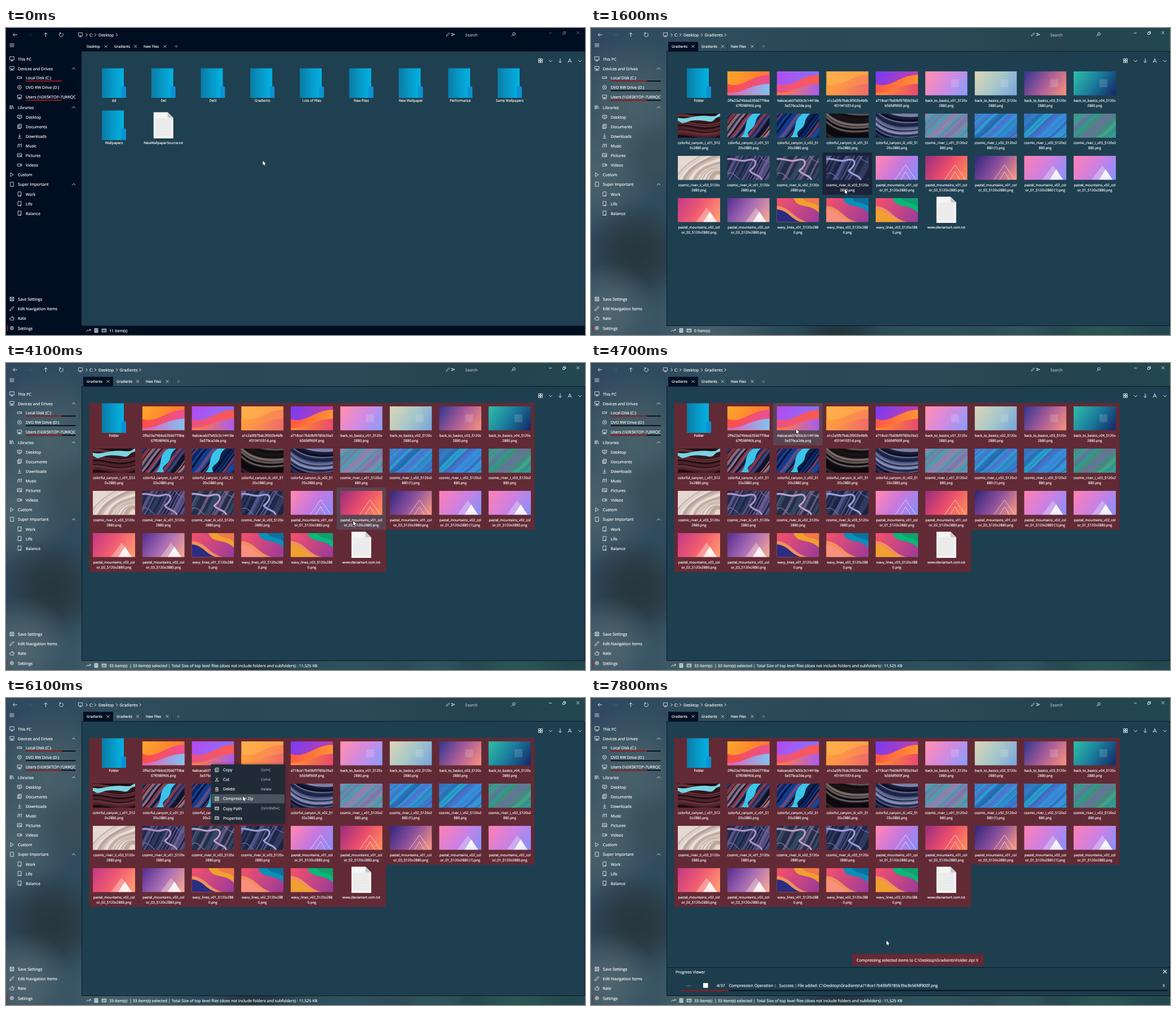
Write an HTML page with a canvas that moves like this. It is 1027 px wide and 545 px high and loops after 8000 ms.

```html
<!DOCTYPE html>
<html>
<head>
<meta charset="utf-8">
<style>
html, body { margin: 0; width: 100%; height: 100%; overflow: hidden; background: #010d20; }
canvas { display: block; }
</style>
</head>
<body>
<canvas id="stage" width="1027" height="545"></canvas>
<script>
const W = 1027, H = 545, LOOP = 8000, RED = '#a31f22', PICK = '#622a35';
const view = document.getElementById('stage').getContext('2d');
let g = view, seed = 1;
const rnd = () => (seed = seed * 16807 % 2147483647) / 2147483647;
const clamp = v => Math.max(0, Math.min(1, v));

// ---- drawing helpers ----
function layer(draw) {
  const c = document.createElement('canvas');
  c.width = W; c.height = H;
  g = c.getContext('2d');
  draw();
  g = view;
  return c;
}
function box(x, y, w, h, fill) {
  g.fillStyle = fill;
  g.fillRect(x, y, w, h);
}
function blend(colors, x0, y0, x1, y1) {
  const l = g.createLinearGradient(x0, y0, x1, y1);
  colors.forEach((c, i) => l.addColorStop(i / Math.max(1, colors.length - 1), c));
  return l;
}
function fill(d, style) { g.fillStyle = style; g.fill(new Path2D(d)); }
function line(d, style = '#fff', width = 0.8) {
  g.strokeStyle = style;
  g.lineWidth = width;
  g.stroke(new Path2D(d));
}
// y is the visual middle of the capitals; the thin outline gives small text its weight
function text(s, x, y, size = 7.07, color = '#fff', align = 'left') {
  g.font = size + 'px "Open Sans", "Noto Sans", sans-serif';
  g.textRendering = 'geometricPrecision';
  g.textAlign = align;
  g.fillStyle = g.strokeStyle = color;
  g.lineWidth = 0.15;
  g.fillText(s, x, y + size * 0.36);
  g.strokeText(s, x, y + size * 0.36);
}
const icons = {
  back: 'M4 0H-3.5M-.5-3L-3.5 0L-.5 3',
  next: 'M-4 0H3.5M.5-3L3.5 0L.5 3',
  up: 'M0 4V-3.5M-3-.5L0-3.5L3-.5',
  down: 'M0-4V3.5M-3 .5L0 3.5L3 .5',
  reload: 'M-1.5-3A3.4 3.4 0 1 0 1.5-3M-3.5-3.5H-1V-1',
  menu: 'M-4-2.5H4M-4 0H4M-4 2.5H4',
  pc: 'M-4-4H4V2H-4ZM0 2V4M-2.5 4H2.5',
  net: 'M-4-3.5H4V1H-4ZM0 1V3.5M-4 3.5H4M-1.5 2.5H1.5',
  drive: 'M-4-1.5H4V1.5H-4ZM2 0H3',
  disc: 'M3.6 0A3.6 3.6 0 1 1-3.6 0A3.6 3.6 0 1 1 3.6 0M1 0A1 1 0 1 1-1 0A1 1 0 1 1 1 0',
  books: 'M-3.7-3.5V3.5M-2-3.5V3.5M0-3.5V3.5M1.2-3.2L3.8 3.5',
  desk: 'M-4-3H4V2H-4ZM-2 3.5H2M-2-1H2',
  doc: 'M-2-4H3.5V2.5H-2ZM-2-2.5H-3.5V4H2V2.5M-.5-2H2M-.5-.3H2',
  load: 'M0-4V2M-2.5-.5L0 2L2.5-.5M-3 4H3',
  music: 'M-3-2L0-3V2M-3-2V3M-4 3H-3M-1 2H0M1-1L3.5-3.5V2.5M2 2.5H3.5',
  image: 'M-4-3H4V3H-4ZM-4 2L-1-1L3 3M1-1L4 2',
  video: 'M-4-2H2V2H-4ZM2-.5L4-2V2L2 .5',
  play: 'M-2.5-3.5L3 0L-2.5 3.5Z',
  page: 'M-3-4H3V4H-3Z',
  note: 'M-3-4H3V4H-3ZM0 2.5H1.5V4',
  save: 'M-3.5-3.5H3.5V3.5H-3.5ZM-2-3.5V-1H2V-3.5M-2 3.5V1H2V3.5',
  pen: 'M-4 4L-3 1L2.5-4L4-2.5L-1.5 3Z',
  thumb: 'M-4 0H-2L0-3.5H1V-1H4L3 3.5H-2L-4 2Z',
  gear: 'M2.8 0A2.8 2.8 0 1 1-2.8 0A2.8 2.8 0 1 1 2.8 0M1.1 0A1.1 1.1 0 1 1-1.1 0A1.1 1.1 0 1 1 1.1 0M0-4V-3M0 3V4M-4 0H-3M3 0H4M-3-3L-2-2M2 2L3 3M3-3L2-2M-2 2L-3 3',
  right: 'M-1.5-2.5L1.5 0L-1.5 2.5',
  open: 'M-3 1.5L0-1.5L3 1.5',
  fold: 'M-3-1.5L0 1.5L3-1.5',
  close: 'M-2.5-2.5L2.5 2.5M2.5-2.5L-2.5 2.5',
  plus: 'M-3 0H3M0-3V3',
  find: 'M3.2-1A2.2 2.2 0 1 1-1.2-1A2.2 2.2 0 1 1 3.2-1M-.6 .6L-3.2 3.2',
  grid: 'M-3.5-3.5H-.5V-.5H-3.5ZM.5-3.5H3.5V-.5H.5ZM-3.5 .5H-.5V3.5H-3.5ZM.5 .5H3.5V3.5H.5Z',
  abc: 'M-3.2 3.5L0-3.5L3.2 3.5M-2 1.2H2',
  send: 'M-3-2.3L3 0L-3 2.3L-1 0Z',
  min: 'M-2.5 0H2.5',
  restore: 'M-2.5-1H1V2.5H-2.5ZM-1-1V-2.5H2.5V1H1',
  chart: 'M-4 2L-1-1L1 1L4-2M1.5-2H4V.5',
  blocks: 'M-3-3.5H3V3.5H-3ZM-1-3.5V3.5M-3-1H3M1-3.5V3.5M-3 1.5H3',
  card: 'M-3.8-2.8H3.8V2.8H-3.8ZM-3.8-1.2H3.8M-3 1H-1M0 1H3',
  cut: 'M-2-4L1.5 2M2-4L-1.5 2M-1 3A1 1 0 1 1-3 3A1 1 0 1 1-1 3M3 3A1 1 0 1 1 1 3A1 1 0 1 1 3 3',
  bin: 'M-3-2.5H3M-2.4-2.5V4H2.4V-2.5M-1-3.8H1M-.8-1V2.5M.8-1V2.5'
};
function icon(name, x, y, color, scale = 1) {
  g.save();
  g.translate(x, y);
  g.scale(scale, scale);
  line(icons[name], color);
  g.restore();
}

// ---- files ----
const desktop = ['dd', 'Del', 'Del3', 'Gradients', 'Lots of Files', 'New Files', 'New Wallpaper',
  'Performance', 'Same Wallpapers', 'Wallpapers', 'NewWallpaperSource.txt'];
const basics = n => `back_to_basics_v0${n}_5120x|2880.png`;
const peaks = (v, n, copy = '') => `pastel_mountains_v0${v}_col|or_0${n}_5120x2880${copy}.png`;
const gradients = ['Folder',
  '2ffe23a74bbc63566779be|67f098f406.png', '4a6cecab37e50c3c14418e|5e57bca2de.png',
  'a1c2a5fb7bdc3f002b4bfb|451941051d.png', 'a718ce17b69bf9785b39a3|b56fdf900f.png',
  basics(1), basics(2), basics(3), basics(4),
  'colorful_canyon_i_v01_512|0x2880.png', 'colorful_canyon_ii_v01_51|20x2880.png',
  'colorful_canyon_ii_v02_51|20x2880.png', 'colorful_canyon_iii_v01_51|20x2880.png',
  'colorful_canyon_iii_v02_51|20x2880.png',
  'cosmic_river_i_v01_5120x2|880.png', 'cosmic_river_i_v02_5120x2|880 (1).png',
  'cosmic_river_i_v02_5120x2|880.png', 'cosmic_river_i_v03_5120x2|880.png',
  'cosmic_river_ii_v03_5120x|2880.png', 'cosmic_river_iii_v01_5120x|2880.png',
  'cosmic_river_iii_v02_5120x|2880.png', 'cosmic_river_iii_v03_5120x|2880.png',
  peaks(1, 1), peaks(1, 2), peaks(1, 3), peaks(2, 1, ' (1)'), peaks(2, 1), peaks(2, 2), peaks(2, 3),
  'wavy_lines_v01_5120x288|0.png', 'wavy_lines_v02_5120x288|0.png', 'wavy_lines_v03_5120x288|0.png',
  'www.deviantart.com.txt'];

// kind, then its colours, one per picture
const looks = `dunes #ffa42c #ff6a30 #ff5038 #e850a0 #d868c8 #80c4f0
dunes #b44cf0 #7a7cf8 #e8508c #ff5a4a #ff7a40 #a85cf0
dunes #ffb04a #ff9a4c #ffa03c #f8805c #ff9848 #ee6c68
dunes #7a3cf0 #d0409c #ff5048 #ff9a30 #ff8a2c #e84c70
logo #ff8fb0 #d48ae0 #8f9cf8
logo #d8d4b8 #a8c8c8 #7ca8dc
logo #3c3a90 #a85c98 #f08c80
logo #2cb8a8 #1a7c9c #14306c
ridge #1c0c14 #5a2830 #2a1018 #904c4c #381820
canyon #10142c #c84850 #24488c #d89490 #14142c
canyon #081434 #2058b8 #0c1c50 #b84c60 #103484
sweep #0c0a0e #3c3030 #18141a #948480 #1c181a
sweep #0a0c1c #2c3868 #141830 #a0a8d8 #182040
silk #5a8ca0 #c070b0 #3cb0b0 #8a70b0 #50a0b8
silk #2c84c4 #28b0d0 #5a68d0 #3c90e0 #2868b0
silk #2c84c4 #28b0d0 #5a68d0 #3c90e0 #2868b0
silk #3c8c84 #30b890 #6a70a0 #2c9c9c #508c70
sand #e4d8d0 #c4a48c #f0e8e4 #b09c98 #d8c8bc
river #1c2444 #7c6ca8 #344468 #d0b0d0
river #243048 #8c74a8 #3c5470 #d8c0d0
river #1c2440 #6c70b0 #3c4870 #bcc0e0
lines #ff86b4 #c878dc #8c8cf8
lines #a0307c #e84c6c #ff8a5c
lines #3a2a80 #8c509c #f09484
peaks #f880b8 #d080e0 #8c90f8
peaks #f880b8 #d080e0 #8c90f8
peaks #c83c84 #f05c70 #ff9a74
peaks #5c3494 #a86cb4 #f0a498
wavy #f0a030 #f07848 #2c2c80
wavy #0890b8 #0c70a0 #f8907c
wavy #08b878 #10a070 #f0a030`.split('\n').map(s => s.split(' '));

// soft overlapping ribbons; curve(u) gives the path for u from 0 to 1
function ribbons(colors, n, width, curve) {
  g.save();
  g.filter = 'blur(0.7px)';
  g.globalAlpha = 0.65;
  for (let k = 0; k < n; k++)
    line(curve(k / n), colors[Math.floor(rnd() * colors.length)], width * (0.3 + rnd()));
  g.restore();
}
const slope = lean => u => {
  const x = u * 150 - 65 + rnd() * 4;
  return `M${x} 46C${x + lean * 0.4} 34 ${x + lean * 0.5} 14 ${x + lean} -4`;
};
const painters = {
  dunes(c) {
    fill('M0 22C26 32 42 6 75 6V42H0Z', blend([c[2], c[3]], 0, 10, 75, 36));
    fill('M0 38C28 40 44 22 75 22V42H0Z', blend([c[4], c[5]], 10, 38, 75, 38));
  },
  logo() { box(46, 14, 14, 14, 'rgba(255,255,255,.15)'); },
  ridge(c) {
    ribbons(c, 26, 4, u => `M-4 ${u * 50}C20 ${u * 50 - 6} 40 ${u * 50 + 14} 80 ${u * 50 - 2}`);
    fill('M0 7C14 12 28 2 52 4S64 2 75 0V5C62 8 66 16 54 14S28 10 16 15S4 12 0 13Z', '#78d4e0');
  },
  canyon(c) {
    ribbons(c, 44, 5, slope(42));
    fill('M24 42C38 30 26 14 46 0H60C46 10 54 18 43 27S38 36 38 42Z', '#3cc4e8');
  },
  silk(c) { ribbons(c, 40, 6, slope(60)); },
  sweep(c) { ribbons(c, 30, 4, u => `M-4 ${u * 64 - 30}C14 ${u * 58 - 6} 44 ${u * 54 + 2} 80 ${u * 50 - 2}`); },
  sand(c) { ribbons(c, 28, 4, u => `M${u * 70 - 8} 46C${u * 70} 22 ${u * 50 + 30} ${u * 30 + 2} 80 ${u * 60 - 20}`); },
  river(c) {
    ribbons(c.slice(0, 3), 30, 6, slope(30));
    const d = 'M-2 6C12 2 22 12 34 8S54 8 48 18S36 24 44 30S60 34 62 46';
    line(d, c[1], 4);
    line(d, c[3], 1.4);
    line('M58 -2C62 10 70 8 78 14M0 32C10 26 16 38 24 44', c[1], 1.2);
  },
  lines() { line('M34 43L53 16L72 43M44 43L53 28L62 43', 'rgba(255,255,255,.85)', 0.7); },
  peaks() {
    fill('M32 42.5L51 17L70 42.5Z', 'rgba(255,255,255,.3)');
    fill('M45 42.500L57 24L69 42.5Z', blend(['#fff', 'rgba(255,255,255,.75)'], 0, 24, 0, 42));
  },
  wavy(c) {
    fill('M30 0C36 20 58 8 75 26V0Z', c[0]);
    fill('M46 0C50 10 64 6 75 15V0Z', c[1]);
    fill('M0 14C26 16 30 38 56 42.5H0Z', '#f0905c');
    fill('M0 20C22 22 24 38 44 42.5H0Z', c[2]);
  }
};
function picture(x, y, i) {
  const [kind, ...c] = looks[i - 1];
  seed = 77 + i * 991;
  g.save();
  g.translate(x, y);
  g.beginPath();
  g.rect(0, 0, 75, 42.5);
  g.clip();
  const base = kind === 'wavy' ? ['#f0506c', '#a03c98'] : kind === 'dunes' ? c.slice(0, 2)
    : /logo|lines|peaks/.test(kind) ? c : [c[0]];
  box(0, 0, 75, 43, blend(base, 6, 0, 69, 42));
  painters[kind](c);
  g.restore();
}
function folder(x, y) {
  box(x - 21.5, y + 0.5, 39, 52.5, blend(['#0a7ba4', '#0699c8', '#02b2e2'], x - 21.5, 0, x + 17.5, 0));
  fill(`M${x + 13} ${y + 35}q0-2.5 3-2.5h3q2.5 0 2.5 2.5v18h-8.5z`, '#0c90d4');
}
function sheet(x, y) {
  fill(`M${x - 17.5} ${y + 3.5}h25l10 10v36.500h-35z`, '#f4f4f4');
  fill(`M${x + 7.5} ${y + 3.5}l10 10h-10z`, '#c4c8cc');
  for (let k = 0; k < 13; k++) line(`M${x - 14} ${y + 15 + k * 2.5}h28`, '#c8c8c8', 0.5);
}
const place = i => [147.6 + i % 9 * 87.75, 71 + Math.floor(i / 9) * 75];
function drawFiles(names) {
  names.forEach((name, i) => {
    const [x, y] = place(i), mid = x + 43.9;
    if (name.endsWith('.txt')) sheet(mid, y);
    else if (name.endsWith('.png')) picture(mid - 37.5, y + 6, i);
    else folder(mid, y);
    name.split('|').forEach((s, k) => text(s, mid, y + 58.3 + k * 8.6, 6.1, '#fff', 'center'));
  });
}
const desktopFiles = layer(() => drawFiles(desktop));
const gradientFiles = layer(() => drawFiles(gradients));

// ---- window ----
const glass = layer(() => {
  box(0, 0, W, H, blend(['#30495f', '#304d5e', '#2a4856', '#2c4a57', '#24434e', '#23484f'], 0, 0, W, 0));
  const blobs = [[75, 140, 125, '#486069'], [10, 260, 110, '#4a626b'], [120, 230, 70, '#3a4f58'],
    [80, 400, 95, '#28363c'], [30, 505, 90, '#4f666e'], [200, 540, 130, '#456069'], [440, 540, 75, '#22353d'],
    [610, 540, 110, '#2e515c'], [760, 540, 80, '#30545c'], [905, 540, 90, '#2a5654']];
  for (const [x, y, r, color] of blobs) {
    const a = g.createRadialGradient(x, y, 0, x, y, r);
    a.addColorStop(0, color);
    a.addColorStop(0.4, color + 'c0');
    a.addColorStop(1, color + '00');
    box(x - r, y - r, r * 2, r * 2, a);
  }
});
const nav = [['pc', 'This PC', 55], ['net', 'Devices and Drives', 72, 0, 1], ['drive', 'Local Disk (C:)', 88.5, 1],
  ['disc', 'DVD RW Drive (D:)', 105.500, 1], ['net', 'Users (\\\\DESKTOP-7URRQC', 122.7, 1], ['books', 'Libraries', 141, 0, 1],
  ['desk', 'Desktop', 158, 1], ['doc', 'Documents', 175, 1], ['load', 'Downloads', 192, 1], ['music', 'Music', 209, 1],
  ['image', 'Pictures', 226, 1], ['video', 'Videos', 243.5, 1], ['play', 'Custom', 260.7, 0], ['page', 'Super Important', 277.7, 0, 1],
  ['note', 'Work', 295, 1], ['note', 'Life', 312, 1], ['note', 'Balance', 329, 1], ['save', 'Save Settings', 481.5],
  ['pen', 'Edit Navigation Items', 498.5], ['thumb', 'Rate', 515.5], ['gear', 'Settings', 533]];

function drawChrome(active, inside) {
  box(0, 0, W, H, '#010d20');
  g.globalAlpha = active;
  g.drawImage(glass, 0, 0);
  g.globalAlpha = 1;
  box(134, 41.5, 892.5, 487, active ? '#1e3f50' : '#1f4050');
  if (active) line('M134.5 528.5V41.500H1026.5V528.5Z', '#071524', 0.9);

  icon('back', 16, 12);
  icon('next', 43, 12, active ? '#4a5f6c' : '#26323f');
  icon('up', 70.5, 12);
  icon('reload', 98, 12);
  icon('menu', 10.5, 30.5);
  icon('pc', 132, 12, '#fff', 0.9);
  const crumbs = [['C:', 148, 158.500], ['Desktop', 164, 196.5]];
  if (inside) crumbs.push(['Gradients', 201.5, 238]);
  icon('right', 143, 12.2);
  for (const [s, x, arrow] of crumbs) { text(s, x, 12.5); icon('right', arrow, 12.2); }
  icon('pen', 784, 11.5, '#fff', 0.75);
  icon('send', 793, 11.5);
  text('Search', 814.5, 12.3, 7.07, '#b4bec6');
  icon('find', 900, 11.5);
  const wc = active ? '#fff' : '#6c7682';
  icon('min', 965.5, 9, wc);
  icon('restore', 990, 9, wc);
  icon('close', 1014.5, 8.500, wc);

  if (inside) {
    box(137, 24.5, 53, 17, '#020f22');
    line('M242.5 27V39M294.5 27V39', 'rgba(0,10,25,.4)', 0.7);
  }
  const shift = inside ? 4 : 0;
  [[inside ? 'Gradients' : 'Desktop', 143, 177 + shift], ['Gradients', 192 + shift, 229.5 + shift],
    ['New Files', 244 + shift, 282 + shift]].forEach(([s, x, end]) => {
    text(s, x, 33, 6.2);
    icon('close', end, 32.700, '#dfe4e8');
  });
  icon('plus', 302 + shift, 32.7, '#7a8791');

  for (const [name, s, y, deep, open] of nav) {
    icon(name, deep ? 24 : 10.5, y - 0.3, '#fff', 0.95);
    g.save();
    g.beginPath();
    g.rect(0, y - 8, 123.5, 16);
    g.clip();
    text(s, deep ? 35 : 21, y);
    g.restore();
    if (open) icon('open', 120, y);
  }
  [94.2, 111.2, 128.3].forEach((y, i) => {
    box(35, y - 0.9, 88.500, 1.8, '#020a14');
    if (i !== 1) box(35, y - 0.9, 64, 1.8, RED);
  });
  box(2, 527.5, 1.2, 11, RED);

  icon('grid', 948, 58);
  icon('fold', 966, 58.5);
  icon('down', 983, 58);
  icon('abc', 1000, 58);
  icon('fold', 1018, 58.5);
  icon('chart', 146, 537);
  icon('blocks', 160, 537);
  icon('card', 174, 537);
}

const commands = [['doc', 'Copy', 'Ctrl+C'], ['cut', 'Cut', 'Ctrl+X'], ['bin', 'Delete', 'Delete'],
  ['save', 'Compress to Zip', ''], ['card', 'Copy Path', 'Ctrl+Shift+C'], ['card', 'Properties', '']];
function drawMenu(x, y) {
  g.save();
  g.shadowColor = 'rgba(0,0,0,.5)';
  g.shadowBlur = 5;
  box(363.5, 118, 131.500, 105, '#212b37');
  g.restore();
  const row = Math.floor((y - 119) / 17.1);
  commands.forEach(([name, s, keys], i) => {
    const cy = 127.6 + i * 17.1;
    if (i === row && x > 364) box(365, cy - 8, 129, 16, '#4b545e');
    icon(name, 374, cy, '#fff', 0.9);
    text(s, 385, cy);
    text(keys, 452.3, cy, 6.1, '#a8b0b8');
  });
}

function drawProgress(done) {
  box(134.5, 478, 892, 50, '#1d3d4d');
  line('M134.5 528.5V478.5H1026.500V528.5Z', '#071524', 0.9);
  text('Progress Viewer', 150, 486.5);
  icon('close', 1018, 485.7, '#fff', 1.3);
  for (let k = 0; k < 3; k++) box(169.5 + k * 3, 510.5, 1, 1, '#fff');
  box(199, 506, 8.5, 8.5, '#fff');
  text('X', 1014, 510.5);
  box(160, 518.3, 863, 2, '#06131f');
  if (!done) return;
  text(done + '/37', 223, 510.5);
  text('Compression Operation ::', 244.5, 510.5);
  text('Success :: File added: C:\\Desktop\\Gradients\\' + gradients[done].replace('|', ''), 333.5, 510.5);
  box(160, 518.3, done * 21, 2, RED);
}

// ---- motion ----
const path = [[0, 455.5, 235.5], [700, 443, 111], [1200, 443, 111], [1600, 450, 286], [1700, 450, 286],
  [2000, 640, 338], [2100, 640, 338], [2600, 723, 354], [3000, 704, 348], [3200, 704, 339], [3300, 704, 339],
  [3400, 704, 337], [3800, 704, 337], [4700, 364, 117.5], [4900, 364, 117.5], [5400, 398, 150], [5500, 398, 150],
  [5900, 420, 174.5], [6200, 420, 174.5], [6900, 460, 325], [7800, 524, 430.5], [LOOP, 524, 430.5]];
function pointer(t) {
  const k = path.findIndex(p => p[0] > t), [t0, x0, y0] = path[k - 1], [t1, x1, y1] = path[k];
  let u = (t - t0) / (t1 - t0);
  u = u * u * (3 - 2 * u);
  return [x0 + (x1 - x0) * u, y0 + (y1 - y0) * u];
}

function draw(t) {
  const inside = t >= 1000, picked = t >= 3900, menu = t >= 4800 && t < 6200;
  const files = inside ? gradients : desktop, art = inside ? gradientFiles : desktopFiles;
  const [mx, my] = pointer(t);
  drawChrome(clamp((t - 800) / 200), inside);

  files.forEach((_, i) => {
    if (inside && t < 1200 + i * 8) return;
    const [x, y] = place(i);
    const over = !menu && mx >= x && mx < x + 87.75 && my >= y && my < y + 75;
    if (picked) box(x, y, 87.9, 75, PICK);
    if (over) box(x, y, 87.75, 75, picked ? 'rgba(85,95,112,.5)' : '#1a2338');
    const sx = Math.floor(x), w = Math.floor(x + 87.75) - sx;
    g.drawImage(art, sx, y, w, 75, sx, y, w, 75);
  });
  if (t >= 1100 && t < 1300)
    for (let k = 0; k < 4; k++) box(136 + k * 3 + (t - 1100) * 3, 42.3, 2, 1.4, RED);

  text(!inside ? '11 item(s)' : !picked ? '0 item(s)' : '33 item(s)  | 33 item(s) selected | Total Size of top level files ' +
    '(does not include folders and subfolders) : 11,525 KB', 183, 537.3);

  if (menu) drawMenu(mx, my);
  if (t >= 6400) drawProgress(t < 6800 ? 0 : Math.min(4, 1 + Math.floor((t - 6800) / 300)));
  if (t >= 6300) {
    box(463, 454, 234, 21.5, PICK);
    text('Compressing selected items to C:\\Desktop\\Gradients\\Folder.zip! X', 471, 465);
  }

  g.save();
  g.translate(mx, my);
  const arrow = 'M0 0V8L1.8 6.3L3 9L4.300 8.4L3.1 5.8H5.6Z';
  line(arrow, '#000', 1);
  fill(arrow, '#fff');
  g.restore();
}

function tick() {
  draw(Math.floor(performance.now() % LOOP / 100) * 100);
  requestAnimationFrame(tick);
}
tick();
</script>
</body>
</html>
```
